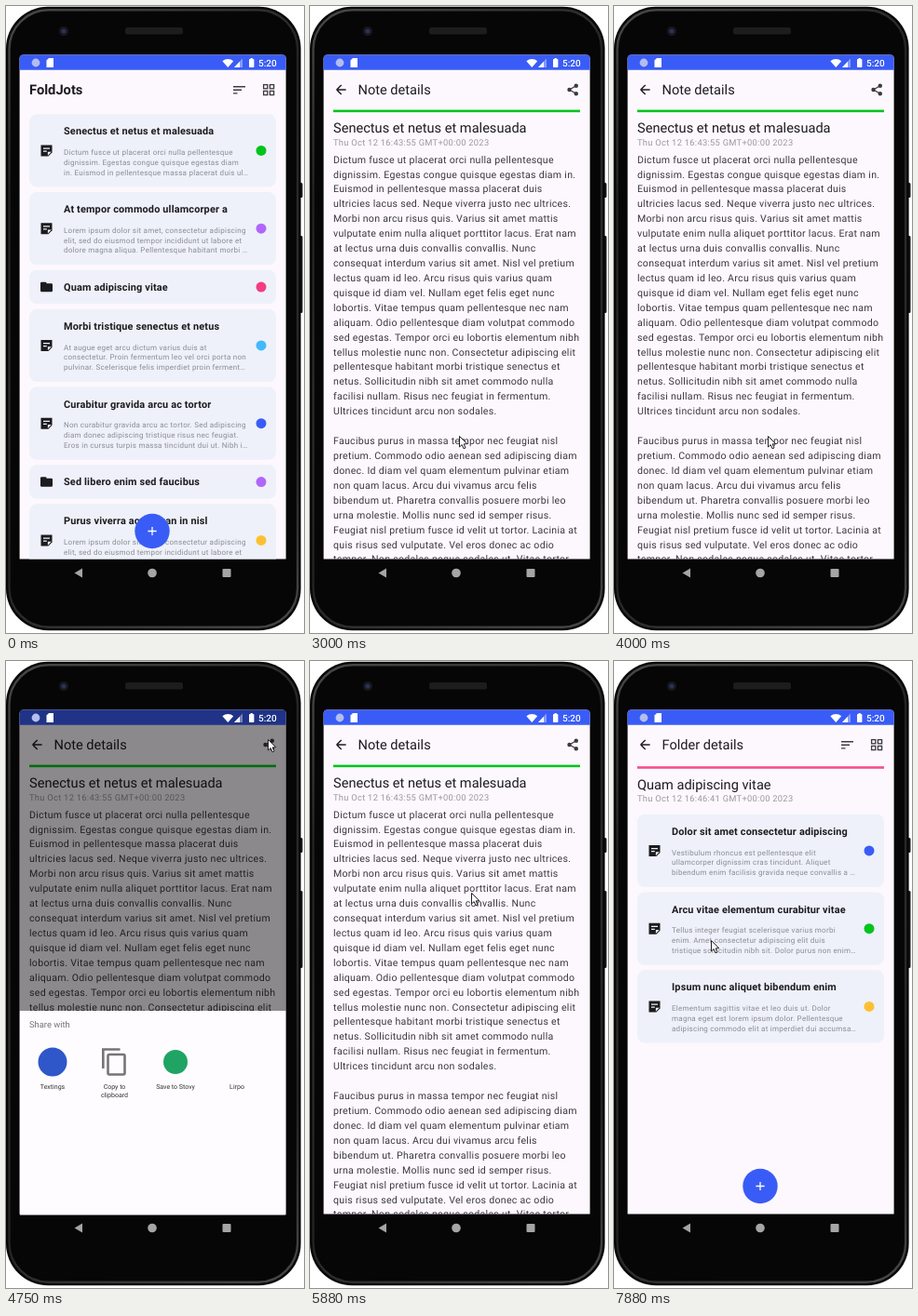
Animation of 320 by 674 pixels, one loop 8000 ms. Source, as an HTML page with a canvas:

```html
<!DOCTYPE html>
<html lang="en">
<head>
<meta charset="utf-8">
<title>Notes app walkthrough</title>
<style>
html, body { margin: 0; width: 100%; height: 100%; overflow: hidden; background: #fff; }
canvas { display: block; width: 320px; height: 674px; }
</style>
</head>
<body>
<canvas id="stage"></canvas>
<script>
const W = 320, H = 674, LOOP = 8000, STEP = 125;
const canvas = document.getElementById('stage');
const ctx = canvas.getContext('2d');
const dpr = window.devicePixelRatio || 1;
canvas.width = W * dpr;
canvas.height = H * dpr;

const BLUE = '#3a5cf6', INK = '#1c1b1f', PAPER = '#fdf8fe', CARD = '#eef1f9';
const GREEN = '#00c41c', PURPLE = '#b066fb', PINK = '#f43c80', SKY = '#41b9fb', YELLOW = '#fdc033';
const SCREEN = { x: 14.6, y: 52.5, w: 286, h: 542 };
const BAR_END = 111;

// Text styles: font, letter spacing, colour
const STYLE = {
  brand: ['700 14.7px', 0, INK],
  title: ['400 14.6px', 0, INK],
  card: ['700 10.9px', 0.16, INK],
  small: ['400 8px', 0.27, '#8b8b92'],
  date: ['400 9.35px', 0.28, '#9a989d'],
  body: ['400 10.6px', 0.28, '#39383d'],
  clock: ['500 10px', 0, '#fff'],
  sheet: ['400 9.4px', 0, '#757575'],
  label: ['400 7px', 0, '#333']
};

const NOTES = [
  ['Senectus et netus et malesuada', GREEN,
    'Dictum fusce ut placerat orci nulla pellentesque',
    'dignissim. Egestas congue quisque egestas diam',
    'in. Euismod in pellentesque massa placerat duis ul…'],
  ['At tempor commodo ullamcorper a', PURPLE,
    'Lorem ipsum dolor sit amet, consectetur adipiscing',
    'elit, sed do eiusmod tempor incididunt ut labore et',
    'dolore magna aliqua. Pellentesque habitant morbi …'],
  ['Quam adipiscing vitae', PINK],
  ['Morbi tristique senectus et netus', SKY,
    'At augue eget arcu dictum varius duis at',
    'consectetur. Proin fermentum leo vel orci porta non',
    'pulvinar. Scelerisque felis imperdiet proin ferment…'],
  ['Curabitur gravida arcu ac tortor', BLUE,
    'Non curabitur gravida arcu ac tortor. Sed adipiscing',
    'diam donec adipiscing tristique risus nec feugiat.',
    'Eros in cursus turpis massa tincidunt dui ut. Nibh i…'],
  ['Sed libero enim sed faucibus', PURPLE],
  ['Purus viverra accumsan in nisl', YELLOW,
    'Lorem ipsum dolor sit amet, consectetur adipiscing',
    'elit, sed do eiusmod tempor incididunt ut labore et',
    'dolore magna aliqua.']
];

const FOLDER = [
  ['Dolor sit amet consectetur adipiscing', BLUE,
    'Vestibulum rhoncus est pellentesque elit',
    'ullamcorper dignissim cras tincidunt. Aliquet',
    'bibendum enim facilisis gravida neque convallis a …'],
  ['Arcu vitae elementum curabitur vitae', GREEN,
    'Tellus integer feugiat scelerisque varius morbi',
    'enim. Amet consectetur adipiscing elit duis',
    'tristique sollicitudin nibh sit. Dolor purus non enim…'],
  ['Ipsum nunc aliquet bibendum enim', YELLOW,
    'Elementum sagittis vitae et leo duis ut. Dolor',
    'magna eget est lorem ipsum dolor. Pellentesque',
    'adipiscing commodo elit at imperdiet dui accumsa…']
];

const BODY = `Dictum fusce ut placerat orci nulla pellentesque
dignissim. Egestas congue quisque egestas diam in.
Euismod in pellentesque massa placerat duis
ultricies lacus sed. Neque viverra justo nec ultrices.
Morbi non arcu risus quis. Varius sit amet mattis
vulputate enim nulla aliquet porttitor lacus. Erat nam
at lectus urna duis convallis convallis. Nunc
consequat interdum varius sit amet. Nisl vel pretium
lectus quam id leo. Arcu risus quis varius quam
quisque id diam vel. Nullam eget felis eget nunc
lobortis. Vitae tempus quam pellentesque nec nam
aliquam. Odio pellentesque diam volutpat commodo
sed egestas. Tempor orci eu lobortis elementum nibh
tellus molestie nunc non. Consectetur adipiscing elit
pellentesque habitant morbi tristique senectus et
netus. Sollicitudin nibh sit amet commodo nulla
facilisi nullam. Risus nec feugiat in fermentum.
Ultrices tincidunt arcu non sodales.

Faucibus purus in massa tempor nec feugiat nisl
pretium. Commodo odio aenean sed adipiscing diam
donec. Id diam vel quam elementum pulvinar etiam
non quam lacus. Arcu dui vivamus arcu felis
bibendum ut. Pharetra convallis posuere morbi leo
urna molestie. Mollis nunc sed id semper risus.
Feugiat nisl pretium fusce id velit ut tortor. Lacinia at
quis risus sed vulputate. Vel eros donec ac odio
tempor. Non sodales neque sodales ut. Vitae tortor
condimentum lacinia quis vel eros donec ac. Non
enim praesent elementum facilisis leo. Facilisis
magna etiam tempor orci eu lobortis elementum
nibh. Risus quis varius quam quisque. Mattis
pellentesque id nibh tortor. Sit amet mattis vulputate
enim nulla. Ut pharetra sit amet aliquam id diam
maecenas ultricies.`.split('\n');

// Keyframes: time, values...
const POINTER = [
  [1250, 296, 420], [1750, 170, 270], [2250, 75, 161], [2500, 75, 161],
  [2875, 160, 462], [3125, 160, 462], [3500, 159, 343], [3625, 159, 343],
  [4000, 165, 462], [4375, 281, 84], [5000, 281, 84], [5375, 173, 249],
  [6000, 173, 249], [6500, 32, 88], [6950, 32, 88], [7125, 41, 132],
  [7500, 104, 300], [8000, 104, 300]
];
const SCROLL = [[3125, 0], [3500, 119.5], [3625, 119.5], [4000, 0]];
const SHEET = [[4500, 0], [4740, 1], [5375, 1], [5625, 0]];
const SCENES = [[0, drawList], [2450, drawNote], [6800, drawList], [7560, drawFolder]];

const clamp = v => Math.max(0, Math.min(1, v));
const ease = v => v * v * (3 - 2 * v);

function track(keys, t) {
  const last = keys[keys.length - 1];
  if (t <= keys[0][0]) return keys[0].slice(1);
  if (t >= last[0]) return last.slice(1);
  const i = keys.findIndex(k => k[0] > t);
  const a = keys[i - 1], b = keys[i];
  const p = ease((t - a[0]) / (b[0] - a[0]));
  return a.slice(1).map((v, n) => v + (b[n + 1] - v) * p);
}

function text(str, x, y, name, align = 'left') {
  const [font, gap, color] = STYLE[name];
  ctx.font = font + ' Roboto, sans-serif';
  ctx.letterSpacing = gap + 'px';
  ctx.textRendering = 'geometricPrecision';
  ctx.fillStyle = color;
  ctx.textAlign = align;
  ctx.fillText(str, x, y);
}

function rect(x, y, w, h, color) {
  ctx.fillStyle = color;
  ctx.fillRect(x, y, w, h);
}

function round(x, y, w, h, r, color) {
  ctx.beginPath();
  ctx.roundRect(x, y, w, h, r);
  ctx.fillStyle = color;
  ctx.fill();
}

function disc(x, y, r, color) {
  ctx.beginPath();
  ctx.arc(x, y, r, 0, 7);
  ctx.fillStyle = color;
  ctx.fill();
}

function poly(points, color) {
  ctx.beginPath();
  points.forEach(([x, y]) => ctx.lineTo(x, y));
  ctx.closePath();
  ctx.fillStyle = color;
  ctx.fill();
}

function lines(list, color, width) {
  ctx.beginPath();
  list.forEach(([x1, y1, x2, y2]) => { ctx.moveTo(x1, y1); ctx.lineTo(x2, y2); });
  ctx.strokeStyle = color;
  ctx.lineWidth = width;
  ctx.stroke();
}

function clip(x, y, w, h, draw) {
  ctx.save();
  ctx.beginPath();
  ctx.rect(x, y, w, h);
  ctx.clip();
  draw();
  ctx.restore();
}

function drawPhone() {
  rect(0, 0, W, H, '#fff');
  round(312, 190, 6.5, 16, 1.5, '#161616');
  round(312, 247, 6.5, 83, 1.5, '#161616');
  round(0, 0.8, 316.6, 670.4, 45, '#060606');
  const rim = ctx.createLinearGradient(0, 0, W, H);
  ['#4a4a4a', '#222', '#2c2c2c', '#222', '#4a4a4a'].forEach((c, i) => rim.addColorStop(i / 4, c));
  ctx.beginPath();
  ctx.roundRect(3.5, 4.3, 309.6, 663.4, 42);
  ctx.strokeStyle = rim;
  ctx.lineWidth = 2.4;
  ctx.stroke();
  disc(62, 27, 5.2, '#15171f');
  disc(62, 27, 2.6, '#2b3152');
  round(128, 23, 62, 7.5, 2.5, '#1d1d1d');
  const key = '#a5a5a5';
  poly([[73.5, 609.5], [82, 604.5], [82, 614.5]], key);
  disc(157, 609.5, 4.8, key);
  round(232.5, 605, 9, 9, 1, key);
}

function drawStatus() {
  disc(32, 61, 4.4, '#b3bdf0');
  poly([[46, 56], [51, 56], [51, 66], [43.5, 66], [43.5, 58.5]], '#fff');
  ctx.beginPath();
  ctx.moveTo(238.3, 66);
  ctx.arc(238.3, 66, 9, -Math.PI * 0.73, -Math.PI * 0.27);
  ctx.fillStyle = '#fff';
  ctx.fill();
  poly([[254, 56.5], [254, 66], [245, 66]], 'rgba(255,255,255,.4)');
  poly([[251, 59.7], [251, 66], [245, 66]], '#fff');
  round(261, 57, 5.4, 9, 0.8, '#fff');
  rect(262.6, 56, 2.2, 1.2, '#fff');
  text('5:20', 271, 64.6, 'clock');
}

function drawBase() {
  const { x, y, w, h } = SCREEN;
  round(x, y, w, h, [4, 4, 0, 0], PAPER);
  round(x, y, w, 16.3, [4, 4, 0, 0], BLUE);
}

function drawTools() {
  lines([[244, 86.7, 257, 86.7], [244, 90.3, 253, 90.3], [244, 93.9, 248.5, 93.9]], '#3b3a3f', 1.4);
  ctx.strokeStyle = '#3b3a3f';
  ctx.lineWidth = 1.3;
  for (const x of [276.6, 283.4]) for (const y of [84.6, 91.4]) ctx.strokeRect(x, y, 4.2, 4.2);
}

function drawBack(title) {
  lines([[28.6, 90, 38.6, 90], [33.7, 84.9, 28.6, 90], [28.6, 90, 33.7, 95.1]], INK, 1.4);
  text(title, 51.5, 95.3, 'title');
}

function drawShare() {
  lines([[278.5, 90, 285.8, 85.7], [278.5, 90, 285.8, 94.3]], '#3b3a3f', 1.3);
  [[278.5, 90], [285.8, 85.7], [285.8, 94.3]].forEach(([x, y]) => disc(x, y, 2.2, '#3b3a3f'));
}

function drawFab() {
  disc(157, 564.5, 18.7, BLUE);
  lines([[152.4, 564.5, 161.6, 564.5], [157, 559.9, 157, 569.1]], '#fff', 1.3);
}

function noteIcon(x, y) {
  poly([[x - 6, y - 6], [x + 6, y - 6], [x + 6, y + 2], [x + 2, y + 6], [x - 6, y + 6]], INK);
  lines([[x - 3.5, y - 2.4, x + 3.5, y - 2.4], [x - 3.5, y + 0.6, x + 0.3, y + 0.6]], CARD, 1.2);
  poly([[x + 1.4, y + 5.2], [x + 1.4, y + 1.4], [x + 5.2, y + 1.4]], CARD);
}

function folderIcon(x, y) {
  round(x - 6.5, y - 5.2, 6.5, 5, 1.2, INK);
  round(x - 6.5, y - 3.7, 13, 9, 1.3, INK);
}

function drawCards(items, y) {
  for (const [title, color, ...rows] of items) {
    const h = rows.length ? 78.25 : 36.5;
    const mid = y + h / 2;
    round(25, y, 265, h, 8, CARD);
    text(title, 62, rows.length ? y + 22 : mid + 3.8, 'card');
    rows.forEach((row, i) => text(row, 62, y + 43.7 + i * 10.75, 'small'));
    (rows.length ? noteIcon : folderIcon)(43.5, mid);
    disc(274, mid, 5.5, color);
    y += h + 5.5;
  }
}

function drawHead(y, color, title, date) {
  rect(25, y, 265, 2.6, color);
  text(title, 25, y + 24.6, 'title');
  text(date, 25, y + 38, 'date');
}

// Limits drawing to the area below the app bar.
function clipContent(draw) {
  clip(SCREEN.x, BAR_END, SCREEN.w, SCREEN.y + SCREEN.h - BAR_END, draw);
}

function drawList() {
  drawBase();
  text('FoldJots', 25, 95.4, 'brand');
  drawTools();
  clipContent(() => drawCards(NOTES, 116.3));
  drawFab();
}

function drawNote(t) {
  const [scroll] = track(SCROLL, t);
  drawBase();
  drawBack('Note details');
  drawShare();
  clipContent(() => {
    drawHead(111.6 - scroll, GREEN, NOTES[0][0], 'Thu Oct 12 16:43:55 GMT+00:00 2023');
    BODY.forEach((row, i) => text(row, 25, 168.6 + i * 15.92 - scroll, 'body'));
    if (scroll > 115) {
      ctx.beginPath();
      ctx.ellipse(215, 597, 78, 18, 0, 0, 7);
      ctx.fillStyle = 'rgba(90,85,100,.07)';
      ctx.fill();
    }
  });
  const [open] = track(SHEET, t);
  if (open > 0) drawSheet(open);
}

function drawFolder() {
  drawBase();
  drawBack('Folder details');
  drawTools();
  drawHead(113.2, '#f4508a', NOTES[2][0], 'Thu Oct 12 16:46:41 GMT+00:00 2023');
  drawCards(FOLDER, 164.8);
  drawFab();
}

function drawSheet(open) {
  const { x, y, w, h } = SCREEN;
  rect(x, y, w, h, `rgba(0,0,0,${0.45 * open})`);
  clip(x, y, w, h + 1, () => {
    ctx.translate(0, 220 * (1 - open));
    rect(x, 376, w, 220, '#fefcfe');
    text('Share with', 25, 394, 'sheet');
    disc(50, 431, 15.5, '#2f57c9');
    ctx.strokeStyle = '#757575';
    ctx.lineWidth = 2.6;
    ctx.beginPath();
    ctx.roundRect(109.5, 423, 18, 21.5, 1.5);
    ctx.moveTo(104.3, 438);
    ctx.lineTo(104.3, 417.5);
    ctx.lineTo(122.5, 417.5);
    ctx.stroke();
    disc(182, 431, 13, '#1fa463');
    text('Textings', 50, 460.3, 'label', 'center');
    text('Copy to', 116.5, 460.3, 'label', 'center');
    text('clipboard', 116.5, 469, 'label', 'center');
    text('Save to Stovy', 182, 460.3, 'label', 'center');
    text('Lirpo', 248, 460.3, 'label', 'center');
  });
}

function drawPointer(t) {
  if (t < POINTER[0][0]) return;
  const [x, y] = track(POINTER, t);
  ctx.save();
  ctx.translate(x, y);
  poly([[0.5, 0.5], [0.5, 12], [3.2, 9.6], [5, 13.8], [7, 13], [5.2, 8.9], [8.8, 8.7]], '#fff');
  ctx.strokeStyle = '#222';
  ctx.lineWidth = 1;
  ctx.stroke();
  ctx.restore();
}

function draw(t) {
  ctx.setTransform(dpr, 0, 0, dpr, 0, 0);
  drawPhone();
  const i = SCENES.findLastIndex(s => s[0] <= t);
  const [start, scene] = SCENES[i];
  const shown = i ? clamp((t - start) / 180) : 1;
  if (shown < 1) SCENES[i - 1][1](t);
  ctx.globalAlpha = shown;
  scene(t);
  ctx.globalAlpha = 1;
  drawStatus();
  drawPointer(t);
}

// The picture advances eight times a second.
function tick() {
  const t = performance.now() % LOOP;
  draw(Math.floor((t + 5) / STEP) * STEP % LOOP);
  requestAnimationFrame(tick);
}
tick();
</script>
</body>
</html>
```
